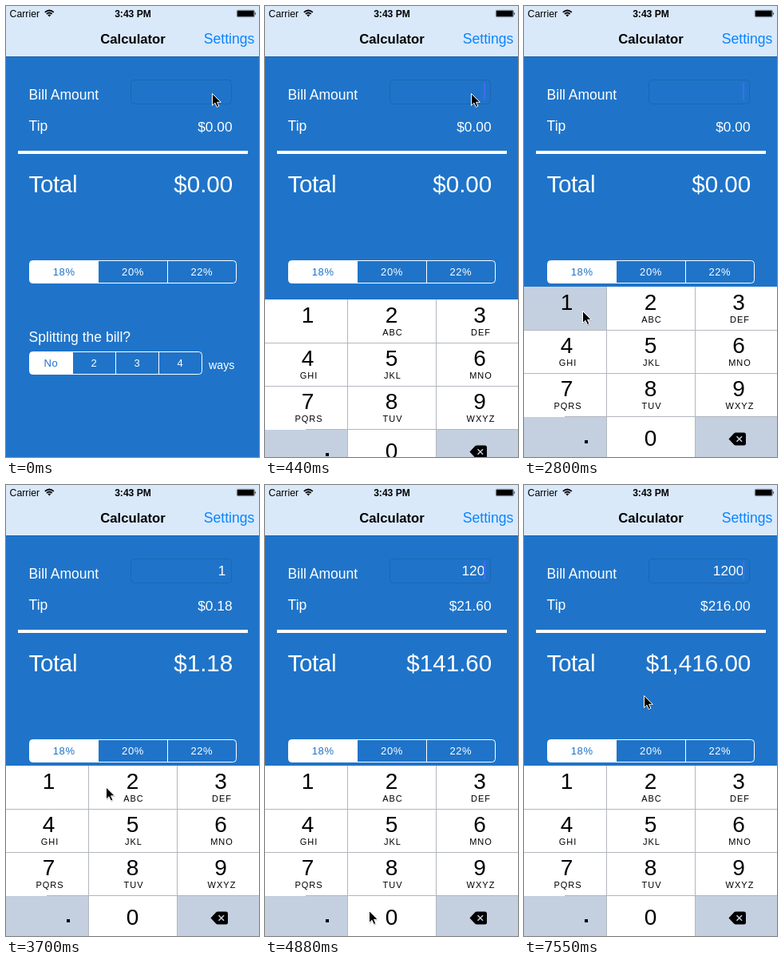
Recreate the animation shown at these times as an HTML page. Size 317 px wide and 564 px high, loop 8 s.

```html
<!DOCTYPE html>
<html lang="en">
<head>
<meta charset="utf-8">
<title>Calculator</title>
<style>
  html, body { margin: 0; width: 100%; height: 100%; overflow: hidden; background: #1f74c9; }
  svg { display: block; width: 317px; height: 564px; }
  text { font-family: "Liberation Sans", Arial, sans-serif; font-size: 17.3px; fill: #fff; }
  .bar text { fill: #000; }
  .label { font-size: 17.5px; }
  .big { font-size: 29.6px; }
  .end { text-anchor: end; }
  .mid { text-anchor: middle; }
  .seg text { font-size: 13px; letter-spacing: .6px; text-anchor: middle; }
  .seg .on { fill: #1f74c9; }
  .key text { fill: #000; font-size: 28px; text-anchor: middle; }
  .key .abc { font-size: 11px; letter-spacing: 1px; }
</style>
</head>
<body>
<svg viewBox="0 0 317 564">
  <rect width="317" height="564" fill="#1f74c9"/>
  <g class="bar">
    <rect width="317" height="63" fill="#d9e9fa"/>
    <rect y="63" width="317" height="1" fill="#1b62ab"/>
    <text x="4.5" y="14" style="font-size:12.3px">Carrier</text>
    <g fill="none" stroke="#000" stroke-width="1.8">
      <path d="M48.8 7.9Q54.3 3 59.8 7.9M50.9 10Q54.3 7 57.7 10"/>
      <path d="M52.3 11.2Q54.3 9.6 56.3 11.2L54.3 13.4Z" fill="#000" stroke="none"/>
    </g>
    <text class="mid" x="159" y="14" style="font-size:12.1px;font-weight:bold">3:43 PM</text>
    <rect x="289.3" y="5.3" width="22" height="8.4" rx="1.5" fill="none" stroke="#000" stroke-width=".5"/>
    <rect x="290" y="6" width="20.6" height="7" rx=".8"/>
    <path d="M312.3 7.6q1.8 1.9 0 3.8z"/>
    <text class="mid" x="159" y="47" style="font-size:16.7px;font-weight:bold">Calculator</text>
    <text class="end" x="311.3" y="47" style="font-size:17.6px;fill:#0a84ff">Settings</text>
  </g>

  <text class="label" x="28.6" y="117">Bill Amount</text>
  <rect x="156.5" y="92.5" width="126" height="30" rx="4" fill="none" stroke="#1a66b4"/>
  <text class="end" id="bill" x="275.3" y="113"></text>
  <rect id="caret" x="274" y="96" width="2" height="22" fill="#426bf2"/>
  <text class="label" x="28.6" y="156">Tip</text>
  <text class="end" id="tip" x="283.5" y="157"></text>
  <rect x="15" y="181" width="288" height="4" fill="#fff"/>
  <text class="big" x="28.6" y="233.4" letter-spacing="-.4">Total</text>
  <text class="big end" id="total" x="284.3" y="233.4"></text>
  <g class="seg" id="rates"></g>
  <text class="label" x="28.6" y="420">Splitting the bill?</text>
  <g class="seg" id="ways"></g>
  <text x="254" y="454" style="font-size:14.2px">ways</text>

  <g id="pad"></g>
  <g id="pointer">
    <path d="M0 0V15L3.5 11.8 5.8 17 8.4 15.9 6.1 10.8H10.8Z" transform="translate(.6 1.2)" fill="#000" opacity=".25"/>
    <path d="M0 0V15L3.5 11.8 5.8 17 8.4 15.9 6.1 10.8H10.8Z" fill="#000" stroke="#fff"/>
  </g>
</svg>
<script>
const $ = id => document.getElementById(id);
const LOOP = 8000, TICK = 148, GREY = '#c4d0e0', PAD_TOP = 351, PAD_H = 213;

function segments(id, y, w, labels) {
  const x = 29.5, step = w / labels.length;
  const edge = i => Math.floor(x + i * step) + .5;
  $(id).innerHTML =
    `<path d="M${edge(1) + .5} ${y}H${x + 4}a4 4 0 0 0-4 4v20a4 4 0 0 0 4 4H${edge(1) + .5}z" fill="#fff"/>
     <rect x="${x}" y="${y}" width="${w}" height="28" rx="4" fill="none" stroke="#fff"/>` +
    labels.map((s, i) =>
      (i > 1 ? `<path d="M${edge(i)} ${y}v28" stroke="#fff"/>` : '') +
      `<text x="${x + (i + .5) * step}" y="${y + 18.8}" class="${i ? '' : 'on'}">${s}</text>`).join('');
}
segments('rates', 318.5, 259, ['18%', '20%', '22%']);
segments('ways', 432.5, 216, ['No', '2', '3', '4']);

const cols = [[0, 103, 53.5], [104, 110, 158.5], [215, 102, 269]];
const letters = ['', 'ABC', 'DEF', 'GHI', 'JKL', 'MNO', 'PQRS', 'TUV', 'WXYZ'];

function key(i) {
  const [x, w, mid] = cols[i % 3], row = Math.floor(i / 3), y = row * 54 + (row ? 1 : 0);
  const face = fill => `<rect x="${x}" y="${y}" width="${w}" height="${row ? 53 : 54}" fill="${fill}"`;
  const digit = (n, base) => `<text x="${mid}" y="${base}">${n}</text>`;
  if (i < 9) return face('#fff') + ` id="k${i + 1}"/>` + digit(i + 1, row * 54 + 29.4) +
    `<text class="abc" x="${mid + 1.5}" y="${row * 54 + 45}">${letters[i]}</text>`;
  if (i === 9) return face(GREY) + '/><path d="M0 162.5H51" stroke="#fff"/><rect x="76" y="192" width="4" height="4"/>';
  if (i === 10) return face('#fff') + ' id="k0"/>' + digit(0, 199);
  return face(GREY) + `/><path d="M256.5 190.5L263 183.4Q264 182.5 265.5 182.5H275.5Q278 182.5 278 185V196Q278 198.5 275.5 198.5H265.5Q264 198.5 263 197.6Z"/>
    <path d="M266.5 187.2l6.6 6.6m0-6.6l-6.6 6.6" stroke="${GREY}" stroke-width="1.5"/>`;
}
$('pad').innerHTML = `<rect width="317" height="${PAD_H}" fill="#b2b7be"/><g class="key">` +
  letters.concat(1, 1, 1).map((_, i) => key(i)).join('') + '</g>';

// Schedule, in ticks
const blinks = [1, 6, 9, 12, 15, 25, 27, 31, 32, 42, 45, 48, 51];
const typed = [[20, 1], [27, 2], [33, 0], [37, 0]];
const presses = [[19, 20, 1], [26, 27, 2], [32, 33, 0], [36, 38, 0]];
const path = [[0, 258, 109], [4, 258, 109], [9, 73, 381], [20, 73, 381], [23, 125, 377.5],
  [27, 125, 377.5], [31, 130, 532], [40, 130, 532], [45, 150, 263], [60, 150, 263]];

const money = v => '$' + v.toLocaleString('en-US', { minimumFractionDigits: 2, maximumFractionDigits: 2 });

function pointerAt(k) {
  const i = path.findIndex(p => p[0] > k);
  const [t0, x0, y0] = path[i - 1], [t1, x1, y1] = path[i];
  const u = (k - t0) / (t1 - t0), e = u * u * (3 - 2 * u);
  return [x0 + (x1 - x0) * e + .5, y0 + (y1 - y0) * e + .5];
}

// Critically damped spring for the rising keypad
function padY(ms) {
  const w = Math.max(0, ms - 212) * .01826;
  const left = ms > 700 ? 0 : (1 + w) * Math.exp(-w);
  return Math.round(PAD_TOP + PAD_H * left);
}

function draw(now) {
  const k = Math.floor((now % LOOP + 12) / TICK);
  const bill = typed.filter(d => d[0] <= k).map(d => d[1]).join('');
  $('bill').textContent = bill;
  $('tip').textContent = money(bill * .18);
  $('total').textContent = money(bill * 1.18);
  $('caret').style.opacity = blinks.filter(b => b <= k).length % 2;
  const down = presses.find(p => p[0] <= k && k < p[1]);
  for (const n of [0, 1, 2]) $('k' + n).setAttribute('fill', down && down[2] === n ? GREY : '#fff');
  $('pad').setAttribute('transform', `translate(0 ${padY(k * TICK)})`);
  $('pointer').setAttribute('transform', `translate(${pointerAt(k)})`);
}

let start;
function frame(now) {
  start ??= now;
  draw(now - start);
  requestAnimationFrame(frame);
}
draw(0);
requestAnimationFrame(frame);
</script>
</body>
</html>
```
